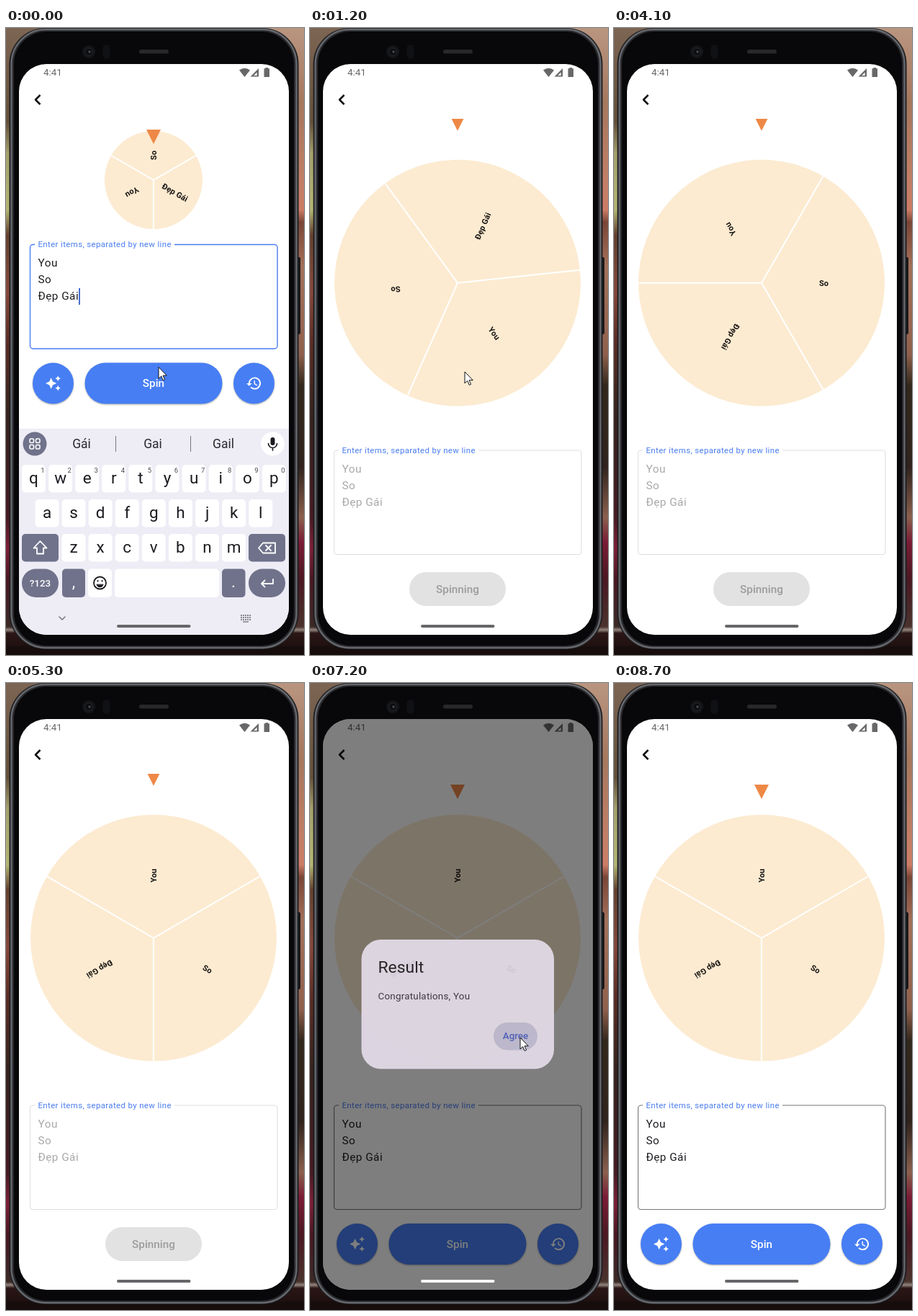
Write an HTML page that moves like this. It is 414x870 px and loops after 8800 ms.

```html
<!DOCTYPE html>
<html lang="en">
<head>
<meta charset="utf-8">
<title>Spin wheel</title>
<style>
  html, body { margin: 0; width: 100%; height: 100%; overflow: hidden; background: #140d0d; }
  svg { display: block; width: 414px; height: 870px; font-family: Roboto, sans-serif; }
  .mid { text-anchor: middle; }
  .slice { font-size: 11px; font-weight: 700; letter-spacing: .15px; text-anchor: middle; fill: #171312; }
  .item { font-size: 15.3px; letter-spacing: .48px; }
  .label { font-size: 11.46px; letter-spacing: .36px; fill: #4a7df0; }
  .button { filter: drop-shadow(0 1px 1px #0005); }
  .key { font-size: 22.5px; text-anchor: middle; fill: #1c1b20; }
  .hint { font-size: 9.5px; text-anchor: middle; fill: #47464d; }
  .word { font-size: 17.5px; text-anchor: middle; fill: #2b2a30; }
  .line { fill: none; stroke-width: 2; stroke-linecap: round; stroke-linejoin: round; }
</style>
</head>
<body>
<svg viewBox="0 0 414 870">
  <defs>
    <clipPath id="screen"><rect x="18" y="50" width="375" height="792" rx="38"/></clipPath>
    <linearGradient id="leftSide" x2="0" y2="1">
      <stop offset="0" stop-color="#7d6553"/><stop offset=".15" stop-color="#62503a"/>
      <stop offset=".2" stop-color="#a5a06c"/><stop offset=".29" stop-color="#b3b673"/>
      <stop offset=".33" stop-color="#64402f"/><stop offset=".42" stop-color="#84493a"/>
      <stop offset=".5" stop-color="#5c2c25"/><stop offset=".62" stop-color="#35231d"/>
      <stop offset=".78" stop-color="#471a22"/><stop offset=".83" stop-color="#7c1f39"/>
      <stop offset=".88" stop-color="#4a1723"/><stop offset=".955" stop-color="#3a2a26"/>
      <stop offset=".96" stop-color="#93857d"/><stop offset=".965" stop-color="#2b1715"/>
      <stop offset="1" stop-color="#170c0c"/>
    </linearGradient>
    <linearGradient id="rightSide" x2="0" y2="1">
      <stop offset="0" stop-color="#b99580"/><stop offset=".12" stop-color="#a5785f"/>
      <stop offset=".24" stop-color="#c17f66"/><stop offset=".29" stop-color="#cc7c67"/>
      <stop offset=".31" stop-color="#7a4637"/><stop offset=".38" stop-color="#a3705a"/>
      <stop offset=".52" stop-color="#8f614d"/><stop offset=".57" stop-color="#33281c"/>
      <stop offset=".7" stop-color="#30231d"/><stop offset=".78" stop-color="#8a604e"/>
      <stop offset=".82" stop-color="#7b1c36"/><stop offset=".88" stop-color="#4b1822"/>
      <stop offset=".955" stop-color="#4a332d"/><stop offset=".96" stop-color="#93857d"/>
      <stop offset=".965" stop-color="#2b1715"/><stop offset="1" stop-color="#170c0c"/>
    </linearGradient>
  </defs>

  <rect width="207" height="870" fill="url(#leftSide)"/>
  <rect x="207" width="207" height="870" fill="url(#rightSide)"/>
  <rect y="858" width="414" height="12" fill="#170d0d"/>

  <rect x="404" y="318" width="5" height="107" rx="2" fill="#18181b"/>
  <rect x="4.500" y="0" width="402" height="862" rx="50" fill="#1d1e21"/>
  <rect x="7.500" y="2" width="396" height="858" rx="48" fill="#28292c" stroke="#66686d" stroke-width="2.400"/>
  <rect x="11" y="5" width="389" height="852" rx="45" fill="#08080a"/>
  <circle cx="115" cy="33" r="9" fill="#141518"/>
  <circle cx="115" cy="33" r="5" fill="#0b0c0f" stroke="#25272c"/>
  <circle cx="116" cy="33" r="1.800" fill="#44484f"/>
  <rect x="134.500" y="23" width="10" height="20" rx="5" fill="#101114"/>
  <rect x="185" y="30" width="41" height="5.500" rx="2.700" fill="#28282b"/>

  <g clip-path="url(#screen)">
    <rect x="18" y="50" width="375" height="792" fill="#fff"/>
    <g fill="#68686a">
      <text x="52" y="66" font-size="13.370">4:41</text>
      <path d="M324 58.500q7.500-5.500 15 0l-7.500 9.500z"/>
      <path d="M351 56v11.500h-11.500zM348.600 61.500l-4.500 4.600h4.500z" fill-rule="evenodd"/>
      <path d="M360.500 55h3.500v1.300h2v11.700h-7.500V56.300h2z"/>
    </g>
    <path class="line" d="M47.500 93l-6.500 6.500 6.500 6.500" stroke="#111" style="stroke-width:2.500;stroke-linecap:butt"/>

    <g id="wheel">
      <circle id="disc" fill="#fcebd1"/>
      <path id="spokes" stroke="#fff" stroke-width="2"/>
      <g id="slices"></g>
    </g>
    <path id="pointer" d="M-10-10h20L0 10z" fill="#ee8847"/>

    <g id="field">
      <rect id="outline" x="33.500" y="300.500" width="343.500" height="144.500" rx="4" fill="none"/>
      <rect x="40" y="295" width="194" height="11" fill="#fff"/>
      <text class="label" x="44.500" y="304.300">Enter items, separated by new line</text>
      <g id="items" class="item">
        <text x="44.500" y="331.300">You</text>
        <text x="44.500" y="354.200">So</text>
        <text x="44.500" y="377.100">Đẹp Gái</text>
      </g>
      <rect id="caret" x="101" y="361" width="2" height="23" fill="#4a6fd0"/>
    </g>

    <g id="row">
      <g id="magic">
        <circle class="button" r="28.500" fill="#477ef4"/>
        <path transform="scale(.955) translate(-12 -12)" fill="#fff" d="M19 9l1.250-2.750L23 5l-2.750-1.250L19 1l-1.250 2.750L15 5l2.750 1.250zM11.500 9.500L9 4 6.500 9.500 1 12l5.500 2.500L9 20l2.500-5.500L17 12zM19 15l-1.250 2.750L15 19l2.750 1.250L19 23l1.250-2.750L23 19l-2.750-1.250z"/>
      </g>
      <g id="history">
        <circle class="button" r="28.500" fill="#477ef4"/>
        <path transform="scale(.955) translate(-12 -12)" fill="#fff" d="M13 3a9 9 0 0 0-9 9H1l3.960 4.030L9 12H6a7 7 0 1 1 2.060 4.940l-1.420 1.420A9 9 0 1 0 13 3zm-1 5v5l4.280 2.540.720-1.210-3.500-2.080V8z"/>
      </g>
      <rect id="spin"/>
      <text id="spinText" class="mid" x="205" y="5.300" font-size="15.300" font-weight="500"></text>
    </g>

    <g id="keyboard">
      <rect x="18" y="556" width="375" height="290" fill="#eeecf5"/>
      <circle cx="40" cy="577" r="16.500" fill="#70728b"/>
      <g class="line" stroke="#fff" style="stroke-width:1.600">
        <rect x="33" y="570" width="5.500" height="5.500" rx="1.500"/><rect x="41.500" y="570" width="5.500" height="5.500" rx="1.500"/>
        <rect x="33" y="578.500" width="5.500" height="5.500" rx="1.500"/><rect x="41.500" y="578.500" width="5.500" height="5.500" rx="1.500"/>
      </g>
      <text class="word" x="105" y="583">Gái</text>
      <text class="word" x="204" y="583">Gai</text>
      <text class="word" x="302" y="583">Gail</text>
      <path d="M152.500 566v22M256.500 566v22" stroke="#77767d"/>
      <circle cx="370.500" cy="577" r="16.500" fill="#fff"/>
      <rect x="367.500" y="568" width="6" height="11" rx="3" fill="#1b1b1f"/>
      <path class="line" d="M364.500 576.500a6 6 0 0 0 12 0M370.500 583v3" stroke="#1b1b1f" style="stroke-width:1.700"/>
      <g id="keys"></g>
      <g class="line" stroke="#fff">
        <path d="M47.500 712l-9 9.500h4.500v8h9v-8h4.500z" style="stroke-width:1.800"/>
        <path d="M357 714.500h17v14h-17l-6-7zM361 718l7 7m0-7l-7 7" style="stroke-width:1.800"/>
        <path d="M371 765v6h-16m4.500-4.500L355 771l4.500 4.500" style="stroke-width:1.800"/>
      </g>
      <g class="line" stroke="#1c1b20">
        <circle cx="130.500" cy="770" r="8.500" style="stroke-width:1.800"/>
        <path d="M126 772.500a4.700 4.700 0 0 0 9 0z" fill="#1c1b20" style="stroke-width:1"/>
        <path d="M127.500 767v.5m6-.5v.5"/>
      </g>
      <path class="line" d="M74 817l4 4 4-4" stroke="#77767f" style="stroke-width:1.500"/>
      <path d="M326 815h14m-14 3h14m-14 3h14" stroke="#85848c" stroke-width="1.800" stroke-dasharray="2 1"/>
      <path d="M329 824h8" stroke="#85848c" stroke-width="1.500"/>
    </g>

    <rect id="scrim" x="18" y="50" width="375" height="792"/>
    <rect id="handle" x="154" y="828" width="102.500" height="4" rx="2"/>
    <g id="dialog">
      <rect x="71.500" y="356" width="267.500" height="179.500" rx="27" fill="#eae2ef"/>
      <text x="94.500" y="401.500" font-size="22.900" fill="#1d1b20">Result</text>
      <text x="94.500" y="438.700" font-size="13.370" letter-spacing=".24" fill="#35323a">Congratulations, You</text>
      <rect id="hover" x="255" y="471" width="61" height="38.500" rx="19.250" fill="#c5c1d8"/>
      <text class="mid" x="285.500" y="494" font-size="13.370" font-weight="500" fill="#4a5fc4">Agree</text>
    </g>
  </g>
  <path id="cursor" d="M0 0v16l3.700-3.500 2.500 5.900 2.400-1-2.500-5.700h5.200z" fill="#fff" stroke="#111"/>
</svg>

<script>
const LOOP = 8800, STEP = 100;
const SPIN_START = 345, SPIN_END = 5400;
const INSET = 285.5, CENTER = 205;
const $ = id => document.getElementById(id);
const set = (id, attrs) => {
  for (const [name, value] of Object.entries(attrs)) $(id).setAttribute(name, value);
};
const show = (id, on) => $(id).style.display = on ? '' : 'none';
const mix = (a, b, p) => a + (b - a) * p;
const ease = p => p * p * (3 - 2 * p);

// Linear interpolation through [time, value] points, held at both ends.
function track(t, points) {
  if (t <= points[0][0]) return points[0][1];
  for (let i = 1; i < points.length; i++) {
    const [t0, a] = points[i - 1], [t1, b] = points[i];
    if (t <= t1) return mix(a, b, (t - t0) / (t1 - t0));
  }
  return points[points.length - 1][1];
}

const DARK = '#70728b';
function key(x, y, w, fill, h = 38.5, rx = 5) {
  return `<rect x="${x}" y="${y}" width="${w}" height="${h}" rx="${rx}" fill="${fill}"/>`;
}
function letters(chars, x, y, hints = '') {
  return [...chars].map((c, i) => {
    const left = x + i * 37.1;
    const hint = hints ? `<text class="hint" x="${left + 29}" y="${y + 10.5}">${hints[i]}</text>` : '';
    return key(left, y, 33, '#fff') + `<text class="key" x="${left + 16.5}" y="${y + 26}">${c}</text>` + hint;
  }).join('');
}
$('keys').innerHTML =
  letters('qwertyuiop', 22, 606, '1234567890') +
  letters('asdfghjkl', 40.5, 654) +
  letters('zxcvbnm', 77.5, 702) +
  key(22, 702, 51, DARK) + key(337, 702, 51, DARK) +
  key(22, 750.5, 51, DARK, 39.5, 19.5) + key(337, 750.5, 51, DARK, 39.5, 19.5) +
  key(78, 750.5, 32, DARK, 39.5) + key(114, 750.5, 33, '#fff', 39.5) +
  key(151, 750.5, 145, '#fff', 39.5) + key(300, 750.5, 32.5, DARK, 39.5) +
  '<text class="mid" x="47.5" y="775" font-size="13.5" font-weight="500" fill="#fff">?123</text>' +
  '<text class="key" x="94" y="776" style="fill:#fff">,</text>' +
  '<text class="key" x="316" y="776" style="fill:#fff">.</text>';

$('slices').innerHTML = ['You', 'So', 'Đẹp Gái'].map(s => `<text class="slice" dy="4">${s}</text>`).join('');

function drawWheel(t, inset) {
  const r = Math.min(171, 68 + inset / 2);
  const x = track(t, [[SPIN_START, 0], [1200, .1743], [2700, .4733], [4100, .7434], [SPIN_END, 1]]);
  const turn = x ? -36000 * (1 - Math.cbrt(x)) ** 3 : -120;
  set('wheel', { transform: `translate(${CENTER} ${211 + inset / 2}) rotate(${turn})` });
  set('disc', { r });
  const dx = r * Math.cos(Math.PI / 6);
  set('spokes', { d: `M0 0V${r}M0 0L${dx} ${-r / 2}M0 0L${-dx} ${-r / 2}` });
  [...$('slices').children].forEach((label, i) =>
    label.setAttribute('transform', `rotate(${i * 120 - 90}) translate(${r * .506} 0)`));
}

function drawControls(t, inset) {
  const spinning = t >= SPIN_START && t < SPIN_END;
  const p = track(t, [[SPIN_START, 1], [650, 0], [SPIN_END, 0], [6000, 1]]);
  const w = mix(134, 191, p), h = mix(47, 57, p);
  set('row', { transform: `translate(0 ${493 + inset})` });
  set('spin', { x: CENTER - w / 2, y: -h / 2, width: w, height: h, rx: h / 2,
    fill: spinning ? '#e2e2e2' : '#477ef4', class: spinning ? '' : 'button' });
  $('spinText').textContent = spinning ? 'Spinning' : 'Spin';
  set('spinText', { fill: spinning ? '#9c9c9c' : '#fff' });
  const gap = w / 2 + 44;
  set('magic', { transform: `translate(${CENTER - gap} 0)`, opacity: p });
  set('history', { transform: `translate(${CENTER + gap} 0)`, opacity: p });

  const focused = t < SPIN_START;
  set('field', { transform: `translate(0 ${inset})` });
  set('outline', { stroke: focused ? '#4a7df0' : spinning ? '#dedede' : '#77757b',
    'stroke-width': focused ? 1.4 : 1.1 });
  set('items', { fill: spinning ? '#a8a8a8' : '#1d1b20' });
  show('caret', focused);

  const lift = track(t, [[SPIN_START, 0], [650, 1], [SPIN_END, 1], [5600, 0]]);
  set('pointer', { transform: `translate(${CENTER} ${mix(151, 134.3, lift)}) scale(${mix(1, .84, lift)})` });
}

function drawDialog(t) {
  const p = track(t, [[5450, 0], [5600, 1], [7182, 1], [7332, 0]]);
  set('scrim', { opacity: .54 * Math.sqrt(p) });
  set('dialog', { opacity: p });
  set('handle', { fill: p > .5 ? '#f7f7f7' : '#67676a' });
  show('hover', t >= 6900);
}

function drawCursor(t) {
  const x = track(t, [[0, 212], [1200, 215], [1900, 225], [2700, 361], [3200, 430],
    [6200, 430], [6900, 292], [7500, 292], [8200, 430]]);
  const y = track(t, [[0, 470.5], [1200, 477], [2700, 507], [3200, 522],
    [6200, 540], [6900, 492], [7500, 492], [8200, 520]]);
  set('cursor', { transform: `translate(${x} ${y})` });
}

function render(now) {
  const t = Math.floor(now % LOOP / STEP) * STEP;
  const inset = INSET * ease(track(t, [[SPIN_START, 0], [700, 1]]));
  drawWheel(t, inset);
  drawControls(t, inset);
  set('keyboard', { transform: `translate(0 ${inset})` });
  show('keyboard', inset < INSET);
  drawDialog(t);
  drawCursor(t);
}

const start = performance.now();
function frame() {
  render(performance.now() - start);
  requestAnimationFrame(frame);
}
frame();
</script>
</body>
</html>
```
